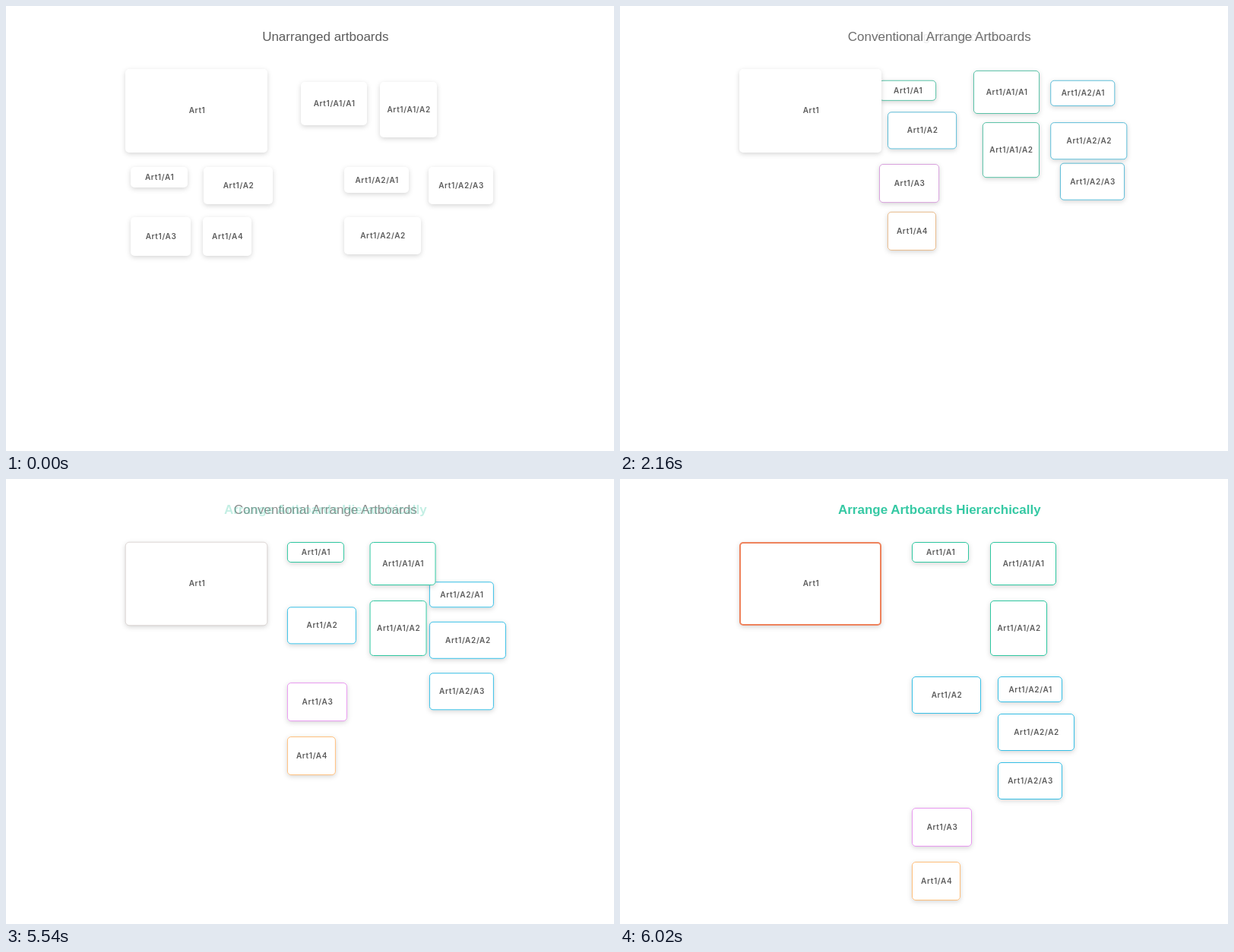
Write an HTML page that moves like this. It is 800 px wide and 586 px high and loops after 8940 ms.

```html
<!DOCTYPE html>
<html lang="en">
<head>
<meta charset="utf-8">
<title>Artboards</title>
<style>
  html, body { margin: 0; width: 100%; height: 100%; overflow: hidden; background: #fff; }
  svg { display: block; width: 100%; height: 100%; }
  text { text-anchor: middle; fill: #5c5c5c; }
  .title { font: 17px "Liberation Sans", Arial, sans-serif; }
  .strong { font-weight: 700; fill: #36c9a4; }
  .label { font: 600 10px Inter, sans-serif; letter-spacing: .65px; }
  .card { fill: #fff; filter: drop-shadow(0 2px 3px rgba(0, 0, 0, .16)); }
  .edge { fill: none; }
</style>
</head>
<body>
<svg id="stage" viewBox="0 0 800 586"></svg>
<script>
const LOOP = 8940, STEP = 20, DURATION = 600;
const STARTS = [1800, 5420];

const TEAL = [46, 199, 160], BLUE = [53, 191, 230], PINK = [232, 152, 240],
      SAND = [255, 190, 122], CORAL = [238, 130, 92];

// name, width, height, edge colour, three positions
const BOARDS = [
  ['Art1', 187, 110, CORAL, [157, 83], [157, 83], [157, 83]],
  ['Art1/A1', 75, 27, TEAL, [164, 212], [364, 83], [384, 83]],
  ['Art1/A1/A1', 87, 57, TEAL, [388, 100], [475, 83], [487, 83]],
  ['Art1/A1/A2', 75, 73, TEAL, [492, 100], [475, 160], [487, 160]],
  ['Art1/A2', 91, 49, BLUE, [260, 212], [364, 130], [384, 260]],
  ['Art1/A2/A1', 85, 34, BLUE, [445, 212], [582, 83], [497, 260]],
  ['Art1/A2/A2', 101, 49, BLUE, [445, 278], [582, 137], [497, 309]],
  ['Art1/A2/A3', 85, 49, BLUE, [556, 212], [582, 206], [497, 373]],
  ['Art1/A3', 79, 51, PINK, [164, 278], [364, 199], [384, 433]],
  ['Art1/A4', 64, 51, SAND, [259, 278], [364, 270], [384, 504]]
];

const TITLES = ['Unarranged artboards', 'Conventional Arrange Artboards',
                'Arrange Artboards Hierarchically'];

const stage = document.getElementById('stage');

function add(parent, tag, attrs, text) {
  const el = document.createElementNS('http://www.w3.org/2000/svg', tag);
  set(el, attrs);
  if (text) el.textContent = text;
  return parent.appendChild(el);
}

function set(el, attrs) {
  for (const key in attrs) el.setAttribute(key, attrs[key]);
}

const mix = (a, b, p) => a + (b - a) * p;

// cubic-bezier(.25, .1, .25, 1)
function ease(x) {
  if (x <= 0) return 0;
  if (x >= 1) return 1;
  const curve = (a, b, u) => 3 * a * u * (1 - u) ** 2 + 3 * b * u * u * (1 - u) + u ** 3;
  let lo = 0, hi = 1;
  for (let i = 0; i < 30; i++) {
    const mid = (lo + hi) / 2;
    if (curve(.25, .25, mid) < x) lo = mid; else hi = mid;
  }
  return curve(.1, 1, lo);
}

const titles = TITLES.map((text, i) => add(stage, 'text',
  { class: i === 2 ? 'title strong' : 'title', x: 420.3, y: 46 }, text));

// The first board lies on top of the later ones.
const boards = BOARDS.slice().reverse().map(([name, w, h, color, ...spots]) => {
  const root = name === 'Art1';
  const group = add(stage, 'g', {});
  add(group, 'rect', { class: 'card', width: w, height: h, rx: 5 });
  const edge = add(group, 'rect', { class: 'edge' });
  add(group, 'text', { class: 'label', x: w / 2 + (root ? 1.1 : .6), y: h / 2 + (root ? 2.7 : 3.5) }, name);
  return { w, h, color, spots, root, group, edge };
});

function drawEdge({ w, h, color, edge }, line, p) {
  const rgb = color.map(c => Math.round(c * p));
  set(edge, {
    x: line / 2, y: line / 2, width: w - line, height: h - line, rx: 5 - line / 2,
    stroke: `rgba(${rgb},${p})`, 'stroke-width': line
  });
}

function render(time) {
  const t = Math.floor((time % LOOP) / STEP) * STEP;
  const [p, q] = STARTS.map(start => ease((t - start) / DURATION));

  [1 - p, p * (1 - q), q].forEach((alpha, i) => set(titles[i], { opacity: alpha }));

  for (const board of boards) {
    const [a, b, c] = board.spots;
    const [x, y] = [0, 1].map(i => mix(mix(a[i], b[i], p), c[i], q));
    set(board.group, { transform: `translate(${x} ${y})` });
    const shown = board.root ? q : p;
    drawEdge(board, shown * (board.root ? 2 : 1), shown);
  }
}

const begin = performance.now();
function tick() {
  render(performance.now() - begin);
  requestAnimationFrame(tick);
}
render(0);
requestAnimationFrame(tick);
</script>
</body>
</html>
```
